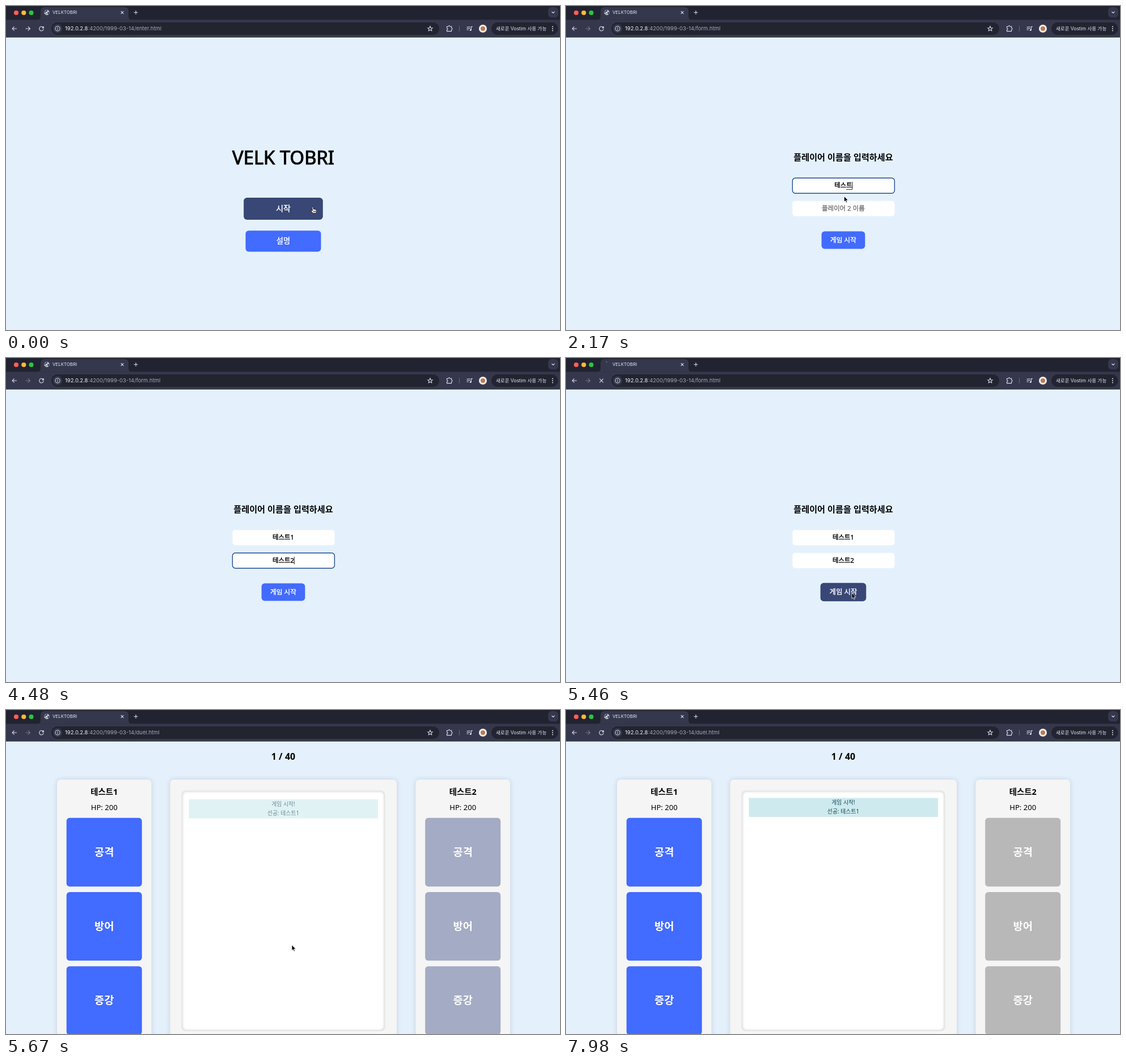
An HTML page for the animation above (8000 ms loop, 977x573 px).

```html
<!DOCTYPE html>
<html lang="ko">
<head>
<meta charset="utf-8">
<title>VELKTOBRI</title>
<style>
html, body { margin: 0; width: 100%; height: 100%; overflow: hidden; background: #e4f1fd; }
svg { display: block; width: 977px; height: 573px; }
text { font-family: "Noto Sans", "Noto Sans CJK KR", sans-serif; text-anchor: middle; }
.ui { font-family: Inter, "Noto Sans CJK KR", sans-serif; text-anchor: start; }
.line { fill: none; stroke: #d9dcec; stroke-width: 1.1; }
.panel { filter: drop-shadow(0 0 4px rgba(0, 0, 0, .14)); }
</style>
</head>
<body>
<svg id="stage" viewBox="0 0 977 573"></svg>
<script>
const LOOP = 8000, STEP = 70;
const BLUE = [66, 107, 255], NAVY = [57, 71, 118], GREY = [184, 184, 184];
const stage = document.getElementById('stage');

const clamp = p => Math.min(1, Math.max(0, p));
const ease = p => 1 - (1 - clamp(p)) ** 2.3;
const mix = (a, b, p) => `rgb(${a.map((v, i) => Math.round(v + (b[i] - v) * p))})`;
const latest = (list, t) => list.reduce((found, [time, value]) => t >= time ? value : found, '');

const rect = (x, y, w, h, r, fill, more = '') =>
  `<rect x="${x}" y="${y}" width="${w}" height="${h}" rx="${r}" fill="${fill}" ${more}/>`;
const circle = (x, y, r, fill, more = '') => `<circle cx="${x}" cy="${y}" r="${r}" fill="${fill}" ${more}/>`;
const line = (d, more = '') => `<path class="line" d="${d}" ${more}/>`;

// y is the middle of the letters; weight 500 is regular with a thin outline
function text(x, y, size, str, fill = '#000', weight = 400, more = '') {
  const style = weight == 500 ? `stroke="${fill}" stroke-width="${size * .03}"` : `font-weight="${weight}"`;
  return `<text x="${x}" y="${y + size * .365}" font-size="${size}" fill="${fill}" ${style} ${more}>${str}</text>`;
}
const button = (cx, cy, w, h, size, label, fill, weight, scale = 1) =>
  `<g transform="translate(${cx} ${cy}) scale(${scale})">${rect(-w / 2, -h / 2, w, h, 5.5, fill)}${text(0, -.5, size, label, '#fff', weight)}</g>`;

const star = (x, y) => 'M' + Array.from({ length: 10 }, (_, i) => {
  const a = i * Math.PI / 5, r = i % 2 ? 2 : 4.5;
  return `${x + r * Math.sin(a)} ${y - r * Math.cos(a)}`;
}).join('L') + 'Z';

function browser(page, loading) {
  const file = { start: 'enter', form: 'form', game: 'duel' }[page];
  const tabIcon = loading
    ? line('M71 7.2l1.2-.2', 'stroke-width=".9"')
    : circle(72, 11.5, 4.7, '#c3c7d6') +
      '<path d="M69 9q2-2.5 4-1.5q.5 2-2 2.5t-1 2q-2 .5-2.5-1zM75.5 10.5q-2.5 0-2.5 1.5t1 2q.5 1.5 1.5-.5t1-2zM69.5 13q2 0 2.5 2.5-2-.5-2.5-2.5" fill="#35384c"/>';
  const reload = loading
    ? line('M59.2 36.7l6.6 6.6m0-6.6l-6.6 6.6')
    : line('M65.9 38.5a3.8 3.8 0 1 0 .3 2.3M66.4 36v2.9h-2.9');
  return rect(0, 0, 977, 25, 0, '#212330') + rect(0, 24.3, 977, 31.4, 0, '#35384c') +
    '<path d="M55 24.5q6 0 6-6V9q0-7 7-7H209q7 0 7 7v9.5q0 6 6 6z" fill="#35384c"/>' +
    circle(18, 12, 4.1, '#ff5f57') + circle(31.3, 12, 4.1, '#febc2e') + circle(44.5, 12, 4.1, '#28c840') +
    tabIcon + text(82, 11.5, 7.9, 'VELKTOBRI', '#e4e6f2', 400, 'class="ui"') +
    line('M202.7 9.2l4.6 4.6m0-4.6l-4.6 4.6M225.5 11.5h7m-3.5-3.5v7') +
    rect(956, 2, 18, 18.5, 6, '#35384c') + line('M962.5 10l2.5 2.5 2.5-2.5') +
    line('M19 40h-8m3.7-3.7L11 40l3.7 3.7') +
    line('M34.5 40h8m-3.7-3.7L42.5 40l-3.7 3.7', `opacity="${page == 'start' ? 1 : .4}"`) + reload +
    rect(80, 29, 684, 22, 11, '#222430') + circle(91, 40, 8, '#35384c') +
    circle(91, 40, 4.1, 'none', 'stroke="#d9dcec"') + line('M91 39.5v2.8M91 37.5v1') +
    text(104, 40, 9.45, `192.0.2.8<tspan fill="#a6a9b8">:4200/1999-03-14/${file}.html</tspan>`, '#f1f2f8', 400, 'class="ui"') +
    line(star(748, 40.3), 'stroke-width=".8"') +
    line('M777.5 36.3h2.5a1.5 1.5 0 0 1 3 0h2.6v2.5a1.5 1.5 0 0 1 0 3v2.8h-8.1v-2.6a1.4 1.4 0 0 0 0-3z') +
    line('M799.5 35v10', 'opacity=".25"') +
    line('M812.5 37h6.5M812.5 39.5h6.5M812.5 42h3.5M820.5 42.5v-6h2.5') + circle(819.3, 42.5, 1.5, '#d9dcec') +
    circle(841, 40, 7, '#f4f2ef') + circle(841, 40, 4, '#c27a50') +
    rect(856, 29, 117.5, 22, 11, '#222430') +
    text(864, 40, 8.5, '새로운 Vostim 사용 가능', '#e4e6f2', 400, 'class="ui"') +
    [36.5, 40, 43.5].map(y => circle(964, y, 1, '#e4e6f2')).join('');
}

const startPage = () =>
  text(489, 268.3, 32.8, 'VELK TOBRI', '#000', 500) +
  button(489, 358.5, 133, 37.2, 13.3, '시작', mix(NAVY, NAVY, 0), 500, 1.05) +
  button(489, 415.8, 133, 37.2, 13.3, '설명', mix(BLUE, BLUE, 0), 500);

const typed = (times, digit) => {
  const parts = ['ㅌ', '테', '테ㅅ', '테스', '테스ㅌ', '테스트', '테스트' + digit];
  return times.map((time, i) => [time, parts[i]]);
};
const fields = [
  { y: 317.8, no: 1, keys: typed([1260, 1470, 1610, 1680, 1890, 1960, 4200], 1) },
  { y: 358.3, no: 2, keys: typed([3010, 3220, 3360, 3430, 3640, 3710, 4480], 2) },
];
const focusAt = [[630, 1], [2310, 2], [3990, 1], [4340, 2], [5320, 0]];
const selectAt = [[3990, 1], [4130, 0], [4340, 2], [4410, 0]];

function field({ y, no, keys }, t) {
  const size = 11.4, str = latest(keys, t), focused = latest(focusAt, t) == no;
  const hangul = size * .92, width = str ? Math.min(3, str.length) * hangul + (str.length > 3 ? 6.5 : 0) : 0;
  const end = 489 + width / 2, selected = latest(selectAt, t) == no;
  let out = rect(399.4, y - 13.5, 180, 27, 5, '#fff', focused ? 'stroke="#1c4a94" stroke-width="1.4"' : '');
  if (selected) out += rect(489 - width / 2, y - 7, width, 14, 0, '#b3d7fe');
  out += str ? text(489, y - .5, size, str, '#000', 500) : text(489, y - .3, size, `플레이어 ${no} 이름`, '#757575', 500);
  if (focused && !selected) {
    out += rect(end - .2, y - 7, .9, 13.5, 0, '#000');
    if (str && str.length < 4 && t < 3990) out += rect(end - hangul, y + 6, hangul, .9, 0, '#000');
  }
  return out;
}

const formPage = t =>
  text(489, 267, 15.2, '플레이어 이름을 입력하세요', '#000', 700) +
  fields.map(f => field(f, t)).join('') +
  button(489, 414, 76.8, 30.8, 11.7, '게임 시작', mix(BLUE, NAVY, ease((t - 4880) / 300)), 500, t >= 4900 ? 1.05 : 1);

function player(x, no, fills, scale) {
  const cx = x + 83.2;
  return rect(x, 123, 166.5, 480, 7, '#f5f5f5', 'class="panel"') +
    text(cx, 144.3, 14.4, '테스트' + no, '#000', 700) + text(cx, 172, 13.1, 'HP: 200') +
    ['공격', '방어', '증강'].map((label, i) =>
      button(cx, 251.5 + i * 131.2, 133, 121.3, 18.7, label, fills[i], 700, i ? 1 : scale)).join('');
}

function gamePage(t) {
  const idle = mix(BLUE, GREY, ease((t - 5510) / 300)), blue = mix(BLUE, BLUE, 0);
  const hover = t <= 6580 ? ease((t - 6440) / 300) : .77 * (1 - ease((t - 6580) / 280));
  const shown = ease((t - 5510) / 470);
  return text(489, 82.3, 16, '1 / 40', '#000', 600) +
    player(90, 1, [mix(BLUE, NAVY, hover), blue, blue], t >= 6440 && t <= 6580 ? 1.05 : 1) +
    player(722.5, 2, [idle, idle, idle], 1) +
    rect(289.5, 123, 399.5, 480, 7, '#f5f5f5', 'class="panel"') +
    '<clipPath id="well"><rect x="309.5" y="142.5" width="359" height="425.5" rx="8"/></clipPath><g clip-path="url(#well)">' +
    rect(309.5, 142.5, 359, 425.5, 8, '#fff') +
    rect(308.5, 141.5, 361, 427.5, 9, 'none', 'stroke="#d4d4d4" stroke-width="5" style="filter:blur(2.2px)"') + '</g>' +
    `<g opacity="${shown}" transform="translate(0 ${(1 - shown) * 6.5})">` +
    rect(322.5, 155.5, 333.5, 33.7, 0, '#cfeaee') +
    text(489, 163.5, 9.9, '게임 시작!', '#0c4a56') + text(489, 179.5, 9.9, '선공: 테스트1', '#0c4a56') + '</g>';
}

// time, x, y of the pointer; a lone time hides it
const track = [
  [0, 541, 356], [350, 541, 356], [630, 497, 313], [700, 495, 320], [840, 490, 475], [1260],
  [2170, 490.5, 336.5], [2240, 490, 352], [2310, 490, 355], [2520, 490, 515], [3010],
  [4690, 524, 352], [4900, 508, 402], [5040, 504, 415.5], [5670, 504, 415.5], [6020, 358, 353],
  [6230, 358, 353], [6440, 215, 262], [6510, 218, 265], [6580, 258, 280.5], [6860, 282, 355],
  [6930, 282, 355], [7140, 379, 545], [7210, 379, 545], [7630, 387, 566], [7700, 387, 566],
  [7840, 387, 570.5], [7910, 387, 570.5], [7980],
];

function pointer(t, page, loading) {
  const i = track.findLastIndex(k => t >= k[0]), a = track[i], b = track[i + 1] || [];
  if (a.length < 2) return '';
  const p = b.length > 1 ? (t - a[0]) / (b[0] - a[0]) : 0;
  const x = a[1] + (p && (b[1] - a[1]) * p), y = a[2] + (p && (b[2] - a[2]) * p);
  const within = (l, top, r, bottom) => x > l && x < r && y > top && y < bottom;
  const hand = page == 'start' || page == 'form' && !loading && within(450, 398, 528, 430) ||
    page == 'game' && within(106, 190, 240, 312);
  const beam = page == 'form' && (within(399, 304, 580, 332) || within(399, 345, 580, 372));
  const shape = beam
    ? '<path d="M-2-5q2 0 2 1.5 0-1.5 2-1.5M0-4V5M-2 6q2 0 2-1.5Q0 6 2 6" fill="none" stroke="#222"/>'
    : hand
      ? '<path d="M-1.3.6Q-1.6-.8-.6-.8T.6.5L1.3 3.5Q2.3 2.8 3 3.7 4 3.1 4.6 4.1 6 3.8 6.2 5.2L6.4 7.5Q6.3 9 5.5 10.5H.5Q-1 8.5-2.8 6.5-3.3 5.4-2 5.2L-.4 6.2zM1.6 6v2.7M3.1 6v2.7M4.6 6v2.7" fill="#fff" stroke="#111" stroke-width=".8"/>'
      : '<path d="M0 0V10L2.3 7.9 3.9 11.4 5.5 10.7 4 7.3H7.2Z" fill="#000" stroke="#fff" stroke-width=".8"/>';
  return `<g transform="translate(${x} ${y})">${shape}</g>`;
}

let last = -1;
function draw(now) {
  const t = Math.floor(now % LOOP / STEP) * STEP;
  if (t != last) {
    last = t;
    const page = t < 280 ? 'start' : t < 5530 ? 'form' : 'game';
    const loading = t == 210 || t == 5460;
    const body = { start: startPage, form: formPage, game: gamePage }[page](t);
    stage.innerHTML = rect(0, 0, 977, 573, 0, '#e4f1fd') + body + browser(page, loading) + pointer(t, page, loading);
  }
  requestAnimationFrame(() => draw(performance.now()));
}
draw(0);
</script>
</body>
</html>
```
